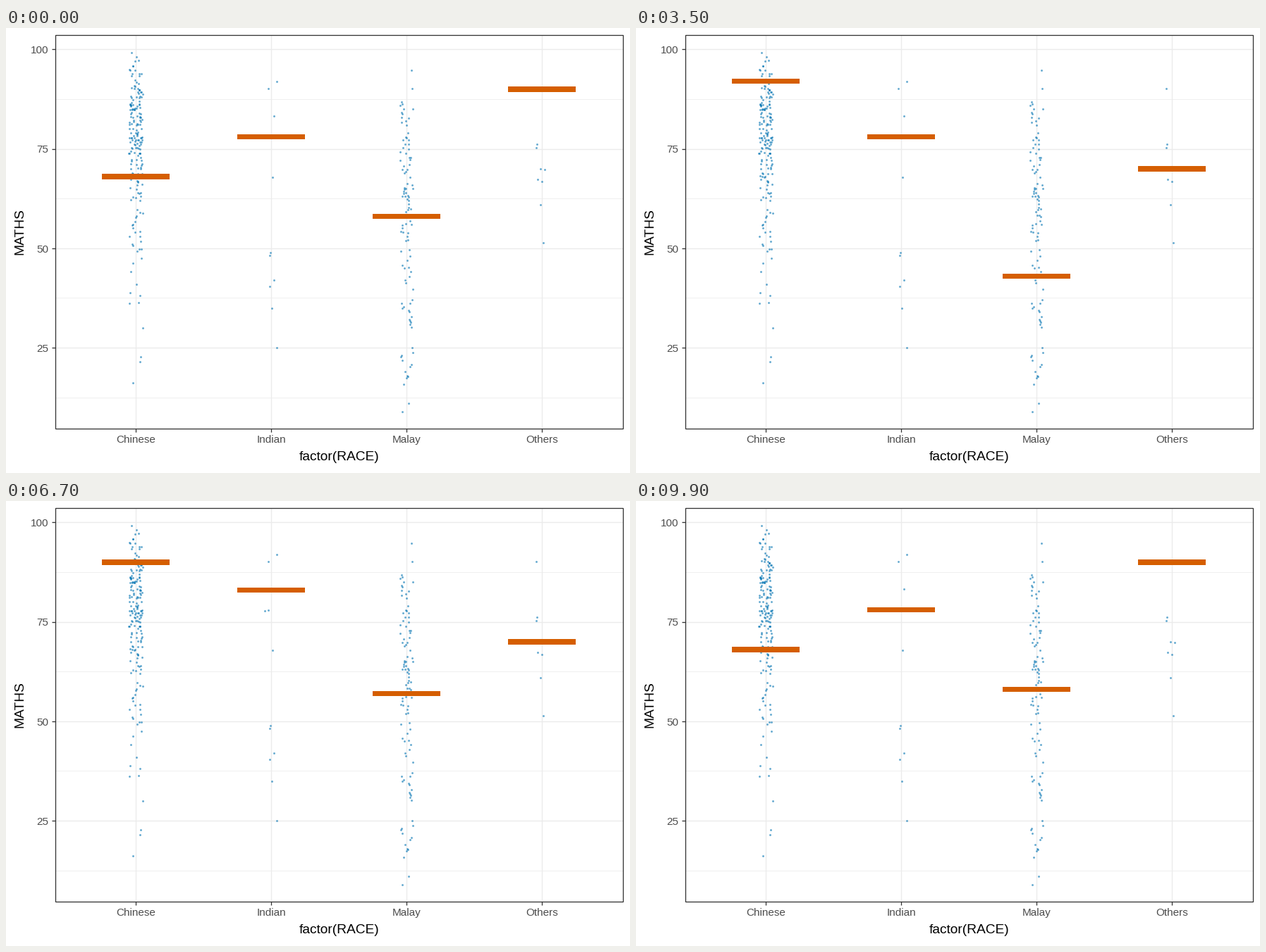
Animation of 885x632 px, one loop 10000 ms. Source, as a matplotlib script:

```python
import numpy as np
import matplotlib.pyplot as plt
from matplotlib.animation import FuncAnimation
from matplotlib.patches import Rectangle

W, H, DPI = 885, 632, 100
PT = 72 / DPI  # points per pixel
LEFT, RIGHT, TOP, BOTTOM = 69.5, 875, 9.5, 568.5
GROUPS = ["Chinese", "Indian", "Malay", "Others"]
CENTERS = [184 + 191.95 * k for k in range(4)]
BAR_W, BAR_H = 96, 7.4
JITTER = 9.6

# The score drawn for each group in each successive outcome.
DRAWS = {
    "Chinese": [68, 91, 71, 97, 83, 79, 85, 74, 93, 91, 91, 75, 86,
                79, 95, 86, 82, 90, 79, 75, 78, 83, 74, 80, 71],
    "Indian": [78] * 12 + [49, 68, 25, 40, 83, 83, 25, 48, 48, 35, 49, 48, 42],
    "Malay": [58, 35, 64, 43, 30, 66, 19, 63, 25, 61, 24, 53, 22,
              65, 64, 73, 16, 57, 64, 75, 35, 66, 83, 70, 65],
    "Others": [90, 67, 70, 75, 70, 70, 75, 67, 70, 70, 75, 67, 90,
               70, 51, 90, 70, 70, 76, 67, 67, 75, 70, 61, 67],
}
OUTCOMES = np.array([DRAWS[name] for name in GROUPS], float).T

# Isolated points as (pixel offset from the group centre, score).
SPARSE = {
    "Chinese": [(8, 47.4), (-4, 46.2), (-7, 44.2), (1, 40.9), (-8, 38.8),
                (6, 38.1), (-9.5, 36.2), (4, 36.3), (9.5, 30), (7, 22.7),
                (6, 21.4), (-4.5, 16.2), (-6, 99.2), (1, 98.1)],
    "Indian": [(8, 91.9), (-4, 90.1), (4, 83.2), (-9, 77.7), (-4, 77.9),
               (2, 67.9), (-1, 48.9), (-2, 48.2), (4.5, 42), (-2, 40.4),
               (1, 34.9), (8.5, 25)],
    "Others": [(-8, 90.1), (-6.5, 76.1), (-8, 75.2), (-1.5, 70), (4.5, 69.8),
               (-6, 67.3), (0, 66.8), (-1.5, 61), (2, 51.4)],
}

# Crowded stretches as (lowest score, highest score, number of points).
DENSE = {
    "Chinese": [(49, 60, 19), (62, 65, 10), (66, 73, 28), (74, 75, 13),
                (76, 79, 28), (80, 84, 26), (85, 86, 18), (87, 91, 23),
                (92, 97, 14)],
    "Malay": [(9, 11, 2), (16, 25, 12), (30, 37, 13), (40, 50, 12),
              (52, 61, 19), (62, 66, 15), (68, 79, 22), (81, 87, 12),
              (90, 95, 2)],
}


def score_y(score):
    return 30.3 + (100 - score) * 5.65


def group_points(rng, name):
    points = list(SPARSE.get(name, []))
    for low, high, count in DENSE.get(name, []):
        scores = np.linspace(low, high, count).round()
        points += zip(rng.uniform(-JITTER, JITTER, count),
                      scores + rng.uniform(-.35, .35, count))
    return np.array(points).T


def line(xs, ys, color, width, z):
    ax.plot(xs, ys, color=color, lw=width * PT, zorder=z,
            solid_capstyle="butt")


def label(x, y, text, size, color, ha="center", rotation=0):
    ax.text(x, y, text, fontsize=size * PT, color=color, ha=ha,
            va="baseline", rotation=rotation, rotation_mode="anchor")


plt.rcParams["font.family"] = "Liberation Sans"
fig = plt.figure(figsize=(W / DPI, H / DPI), dpi=DPI, facecolor="white")
ax = fig.add_axes([0, 0, 1, 1])
ax.set_xlim(0, W)
ax.set_ylim(H, 0)
ax.axis("off")

GRID, DARK, TICK_TEXT = "#EBEBEB", "#333333", "#4D4D4D"
for score in np.arange(12.5, 100, 25):
    line([LEFT, RIGHT], [score_y(score)] * 2, GRID, .8, 1)
for score in range(25, 101, 25):
    y = score_y(score)
    line([LEFT, RIGHT], [y, y], GRID, 1.39, 1)
    line([LEFT - 5, LEFT], [y, y], DARK, 1.3, 5)
    label(60.5, y + 5.9, str(score), 15.3, TICK_TEXT, ha="right")

rng = np.random.default_rng(7)
bars = []
for x, name in zip(CENTERS, GROUPS):
    line([x, x], [TOP, BOTTOM], GRID, 1.39, 1)
    line([x, x], [BOTTOM, BOTTOM + 5], DARK, 1.3, 5)
    label(x, 589.3, name, 15.3, TICK_TEXT)
    offsets, scores = group_points(rng, name)
    ax.scatter(x + offsets, score_y(scores), s=(2.9 * PT) ** 2,
               color="#0072B2", alpha=.6, linewidths=0, zorder=3)
    bars.append(ax.add_patch(Rectangle((x - BAR_W / 2, 0), BAR_W, BAR_H, lw=0,
                                       fc="#D55E00", zorder=4)))

label((LEFT + RIGHT) / 2, 614.3, "factor(RACE)", 19.1, "black")
label(24.6, (TOP + BOTTOM) / 2, "MATHS", 19.1, "black", rotation=90)
ax.add_patch(Rectangle((LEFT, TOP), RIGHT - LEFT, BOTTOM - TOP, fill=False,
                       ec=DARK, lw=1.3 * PT, zorder=5))


def scores_at(frame):
    """Hold each outcome, with one halfway frame before the next."""
    # The thirteenth outcome is held one frame less, shifting the rest.
    step = frame if frame < 50 else frame + 1
    state, phase = divmod(step, 4)
    now = OUTCOMES[state % len(OUTCOMES)]
    if phase < 3:
        return now
    return (now + OUTCOMES[(state + 1) % len(OUTCOMES)]) / 2


def update(frame):
    for bar, score in zip(bars, scores_at(frame)):
        bar.set_y(score_y(score) - BAR_H / 2)
    return bars


anim = FuncAnimation(fig, update, frames=100, interval=100, repeat=True,
                     repeat_delay=0, blit=False)
plt.show()
```
